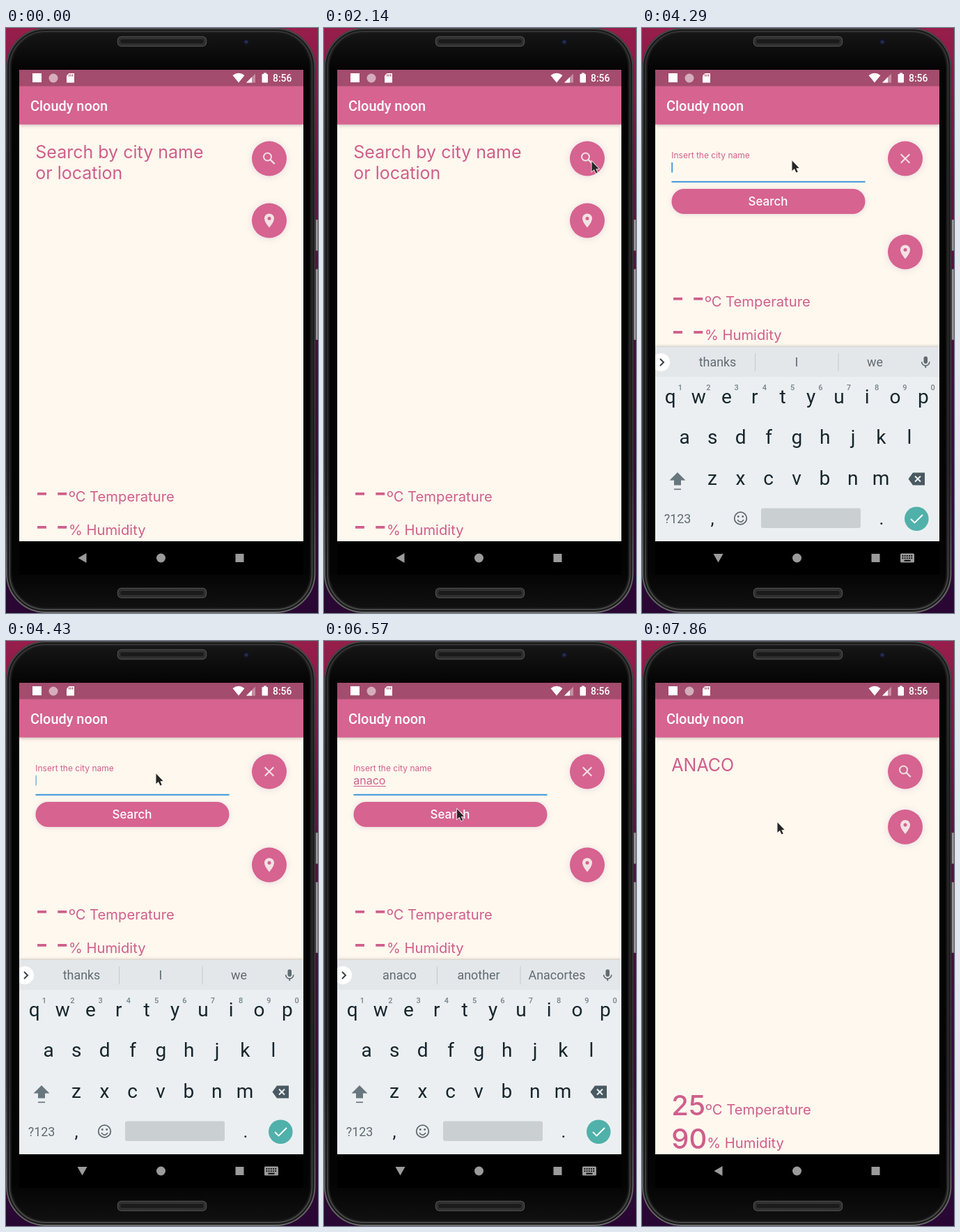
Recreate the animation shown at these times as an HTML page with a canvas. Size 448x840 px, loop 8000 ms.

```html
<!DOCTYPE html>
<html lang="en">
<head>
<meta charset="utf-8">
<title>Cloudy noon</title>
<style>
html, body { margin: 0; width: 100%; height: 100%; overflow: hidden; background: #2b0a34; }
canvas { display: block; width: 448px; height: 840px; }
</style>
</head>
<body>
<canvas id="stage" width="448" height="840"></canvas>
<script>
const g = document.getElementById('stage').getContext('2d');
const LOOP = 8000, FPS = 7;
const PINK = '#d66390', INK = '#cf5f8c', CREAM = '#fff8ee', ICON = '#f3e2e3';
const GREY = '#9b9b9b', BLUE = '#3b97dc', KEY = '#17262d', SLATE = '#5f6b71';
const HALO = 'rgba(165,140,185,.3)';
const UI = 'Inter, sans-serif', SYS = 'Roboto, sans-serif';
const LEFT = 42.3, BOTTOM = 737;

// Times below count steps of 1/7 second.
const OPEN = 17, FOCUS = 27, RAISE = 28, RESULT = 52;
const TYPED = [33, 35, 36, 38, 40];
const CITY = 'anaco';
const HINTS = [
  ['thanks', 'I', 'we'], ['a', 'and', 'are'], ['an', 'and', 'any'],
  ['ana', 'an', 'and'], ['anac', 'an', 'and'], ['anaco', 'another', 'Anacortes']
];
const POINTER = [
  [7, 447, 262], [12, 384, 191], [17, 384, 191], [22, 198, 187], [24, 198, 187],
  [26, 215, 190], [43, 215, 190], [47, 186, 250], [50, 186, 250], [52, 189, 260], [55, 194, 260]
];
// Keyboard offset and opacity while it slides in or out.
const BOARD = { 28: [70, .45], 29: [16, .9], 52: [4, .94], 53: [48, .45] };

function text(s, x, y, size, color, family = UI, weight = 400, align = 'left') {
  g.font = `${weight} ${size}px ${family}`;
  g.fillStyle = color;
  g.textAlign = align;
  g.fillText(s, x, y);
  return g.measureText(s).width;
}

function rect(x, y, w, h, color) {
  g.fillStyle = color;
  g.fillRect(x, y, w, h);
}

function round(x, y, w, h, r, fill, stroke, line = 1) {
  g.beginPath();
  g.roundRect(x, y, w, h, r);
  if (fill) { g.fillStyle = fill; g.fill(); }
  if (stroke) { g.strokeStyle = stroke; g.lineWidth = line; g.stroke(); }
}

function disc(x, y, r, color) {
  g.beginPath();
  g.arc(x, y, r, 0, 7);
  g.fillStyle = color;
  g.fill();
}

function poly(color, ...p) {
  g.beginPath();
  for (let i = 0; i < p.length; i += 2) g.lineTo(p[i], p[i + 1]);
  g.closePath();
  g.fillStyle = color;
  g.fill();
}

function line(color, width, ...p) {
  g.beginPath();
  for (let i = 0; i < p.length; i += 2) g.lineTo(p[i], p[i + 1]);
  g.strokeStyle = color;
  g.lineWidth = width;
  g.stroke();
}

function ring(x, y, r, color, width, from = 0, to = 7) {
  g.beginPath();
  g.arc(x, y, r, from, to);
  g.strokeStyle = color;
  g.lineWidth = width;
  g.stroke();
}

function shadowed(color, blur, dy, draw) {
  g.save();
  g.shadowColor = color;
  g.shadowBlur = blur;
  g.shadowOffsetY = dy;
  draw();
  g.restore();
}

function fade(...stops) {
  const f = g.createLinearGradient(0, 0, 0, 840);
  stops.forEach((c, i) => f.addColorStop(i / (stops.length - 1), c));
  return f;
}

function phone() {
  rect(0, 0, 448, 840, fade('#971e4b', '#6b1546', '#47103f', '#360c3c', '#290733'));
  for (const [y, h] of [[275, 45], [346, 102]]) {
    round(441, y, 9, h, 2, '#777177');
    rect(445.5, y + 1, 1.5, h - 2, '#aaa5a8');
  }
  round(0, 0, 444.5, 840, 57, '#191919');
  round(1, 1, 442.5, 838, 56, null, fade('#4a4a4a', '#383838', '#383838', '#383838', '#6a6a6a'), 2);
  round(5, 5, 434.5, 830, 52, null, fade('#343434', '#2a2a2a', '#2a2a2a', '#2a2a2a', '#484848'), 2);
  const sheen = Array(13).fill('#040404');
  round(8, 8, 428.5, 824, 49, fade('#181818', ...sheen, '#121212'));
  for (const y of [12, 804]) {
    round(160.5, y + .5, 127, 13.5, 5, '#2b2b2b', '#484848', 1.5);
    round(163.5, y + 3.5, 121, 7.5, 3, '#1b1b1b', '#3c3c3c');
  }
  disc(345, 20, 5, '#11131f');
  disc(345, 20, 2.5, '#262c50');
}

function statusBar() {
  rect(19, 60, 408, 23.5, '#a34c6d');
  rect(38, 65, 13, 13, '#fff');
  disc(68, 72, 6.5, '#d5adbc');
  poly('#fff', 90.5, 65, 98, 65, 98, 78.5, 87, 78.5, 87, 68.5);
  for (const x of [90, 92.5, 95]) rect(x, 66.5, 1.2, 3, '#a34c6d');
  g.beginPath();
  g.moveTo(334, 78.5);
  g.lineTo(325.5, 68);
  g.quadraticCurveTo(334, 61.5, 342.5, 68);
  g.closePath();
  g.fillStyle = '#fff';
  g.fill();
  poly('#c68ca2', 345, 78.5, 358, 65.5, 358, 78.5);
  poly('#fff', 345, 78.5, 353, 70.5, 353, 78.5);
  rect(370, 64.5, 4, 2, '#fff');
  round(367.5, 66, 8.5, 12.5, 1, '#fff');
  text('8:56', 383, 77, 13.9, '#fff', SYS, 500);
}

function appBar() {
  shadowed('rgba(90,50,70,.3)', 5, 1, () => rect(19, 83, 408, 55.5, PINK));
  statusBar();
  text('Cloudy noon', 35, 118.5, 19.9, '#fff', SYS, 500);
}

function button(x, y, icon) {
  shadowed(HALO, 10, 1, () => disc(x, y, 25, PINK));
  g.save();
  g.translate(x - 12, y - 12);
  icon();
  g.restore();
}

const icons = {
  search() {
    ring(9.5, 9.5, 5.5, ICON, 2);
    line(ICON, 2.2, 13.6, 13.6, 19.8, 19.8);
  },
  close() {
    line(ICON, 2, 5.7, 5.7, 18.3, 18.3);
    line(ICON, 2, 18.3, 5.7, 5.7, 18.3);
  },
  pin() {
    g.beginPath();
    g.moveTo(12, 22);
    g.bezierCurveTo(12, 22, 5, 14.3, 5, 9);
    g.arc(12, 9, 7, Math.PI, 0);
    g.bezierCurveTo(19, 14.3, 12, 22, 12, 22);
    g.fillStyle = ICON;
    g.fill();
    disc(12, 9, 2.5, PINK);
  }
};

function reading(value, label, y) {
  const w = text(value, LEFT, y, 40, INK, UI, 500);
  text(label, LEFT + w, y - 1, 20.2, INK);
}

function form(n, count) {
  const focused = n >= FOCUS;
  const up = Math.max(0, Math.min(1, (n - FOCUS + 1) / 2));
  text('Insert the city name', LEFT, 198.5 - 12 * up, 16 - 4 * up, INK);
  rect(42.5, focused ? 219.8 : 220.5, 278, focused ? 2 : 1, focused ? BLUE : '#aaa49d');
  const w = count ? text(CITY.slice(0, count), LEFT, 206, 16, INK) : 0;
  if (count) rect(42.5, 208, w, 1, INK);
  if (focused) {
    const typing = n >= TYPED[0] && n < 43;
    g.globalAlpha = typing ? 1 : [1, 1, 1, .6, 0, 0, 0][n % 7];
    rect(LEFT + w, count ? 191 : 193, 1.8, count ? 18 : 14.5, BLUE);
    g.globalAlpha = 1;
  }
  shadowed(HALO, 7, 1, () => round(42.5, 231, 278, 36, 18, PINK));
  text('Search', 181, 255, 17, '#fff', UI, 500, 'center');
}

function content(n, count) {
  const open = n >= OPEN && n < RESULT, done = n >= RESULT;
  rect(19, 83, 408, BOTTOM - 83, CREAM);
  if (open) {
    form(n, count);
  } else if (done) {
    text(CITY.toUpperCase(), LEFT, 187, 25, INK);
  } else {
    text('Search by city name', LEFT, 187, 25, INK);
    text('or location', LEFT, 217, 25, INK);
  }
  button(378, 187.5, open ? icons.close : icons.search);
  button(378, open ? 321.5 : done ? 267 : 276.5, icons.pin);
  const lift = n >= RAISE && n < RESULT ? 280 : 0;
  reading(done ? '25' : '- -', 'ºC Temperature', 681 - lift);
  reading(done ? '90' : '- -', '% Humidity', 728.5 - lift);
}

function keyRow(letters, x, y) {
  [...letters].forEach((c, i) => text(c, x + i * 40.35, y, 28, KEY, SYS, 400, 'center'));
}

function suggestions(count) {
  rect(19, 458, 408, 43, '#e4e7ea');
  disc(27, 480, 13, '#fff');
  line('#3b4449', 2, 26, 475, 31, 480, 26, 485);
  rect(162, 467, 1, 26, '#c3c9cc');
  rect(281.5, 467, 1, 26, '#c3c9cc');
  HINTS[count].forEach((s, i) => {
    const bold = i === 1 && count > 0 && count < 5;
    text(s, [108.5, 222, 334.5][i], 486, 17.9, SLATE, SYS, bold ? 700 : 400, 'center');
  });
  round(404.5, 471.5, 5.5, 10.5, 2.75, SLATE);
  ring(407.2, 479.3, 5.6, SLATE, 1.6, 0, Math.PI);
  rect(406.4, 484.5, 1.7, 3.5, SLATE);
}

function keyboard(count, dy, alpha) {
  g.save();
  g.beginPath();
  g.rect(19, 139, 408, BOTTOM - 139 + Math.min(dy, 4));
  g.clip();
  g.translate(0, dy);
  g.globalAlpha = alpha;
  shadowed('rgba(60,60,60,.3)', 4, -1, () => rect(19, 458, 408, 280, '#eceff1'));
  suggestions(count);
  keyRow('qwertyuiop', 40.8, 539);
  keyRow('asdfghjkl', 61, 597);
  keyRow('zxcvbnm', 101, 655.5);
  [...'1234567890'].forEach((c, i) =>
    text(c, 55 + i * 40.3, 519.5, 11, '#75838a', SYS, 500, 'center'));
  poly('#68777e', 51, 638, 62.5, 649.5, 56, 649.5, 56, 656.5, 46, 656.5, 46, 649.5, 39.5, 649.5);
  rect(46, 661.5, 10, 1.7, '#68777e');
  poly('#485961', 382.5, 647.5, 389, 638.5, 406, 638.5, 406, 656.5, 389, 656.5);
  line('#eceff1', 2, 392, 643.5, 400, 651.5);
  line('#eceff1', 2, 400, 643.5, 392, 651.5);
  text('?123', 51, 710.5, 17.9, SLATE, SYS, 400, 'center');
  text(',', 101, 713, 26, KEY, SYS, 400, 'center');
  text('.', 344, 713, 26, KEY, SYS, 400, 'center');
  ring(141.5, 704, 8.8, SLATE, 1.8);
  disc(138.3, 701.5, 1.4, SLATE);
  disc(144.7, 701.5, 1.4, SLATE);
  ring(141.5, 704.5, 4.6, SLATE, 1.7, .35, 2.8);
  round(171, 689.5, 143, 28.5, 3, '#cacfd2');
  disc(394.3, 704.7, 17.3, '#50b1aa');
  line('#fff', 1.9, 386, 705, 391.5, 710.5, 403, 699);
  g.restore();
}

function navBar(raised) {
  if (raised) {
    poly(GREY, 102.5, 755, 116.5, 755, 109.5, 767.5);
    round(371, 754.5, 20, 13, 1.5, GREY);
    for (let i = 0; i < 10; i++) rect(373.5 + i % 5 * 3.2, 757 + (i / 5 | 0) * 3.3, 1.8, 1.8, '#000');
    rect(376.5, 763.8, 9, 1.8, '#000');
  } else {
    poly(GREY, 103.5, 761, 115.5, 754, 115.5, 768);
  }
  disc(222.5, 761, 6.5, GREY);
  rect(329.5, 755, 12, 12, GREY);
}

function pointer(n) {
  if (n < POINTER[0][0]) return;
  const i = Math.max(1, POINTER.findIndex(p => p[0] >= n));
  const [a, ax, ay] = POINTER[i - 1], [b, bx, by] = POINTER[i];
  const k = (n - a) / (b - a), e = k * k * (3 - 2 * k);
  g.save();
  g.translate(ax + (bx - ax) * e + .5, ay + (by - ay) * e + .5);
  g.beginPath();
  for (const [x, y] of [[0, 0], [0, 14.5], [3.4, 11.5], [6, 17], [8.2, 16], [5.8, 10.8], [10, 10.5]]) g.lineTo(x, y);
  g.closePath();
  g.strokeStyle = '#f4eef0';
  g.lineWidth = 1.6;
  g.stroke();
  g.fillStyle = '#262626';
  g.fill();
  g.restore();
}

function draw(ms) {
  const n = Math.min(55, Math.floor((ms % LOOP + 5) * FPS / 1000));
  const count = TYPED.filter(t => n >= t).length;
  phone();
  rect(19, 60, 408, 725, '#000');
  g.save();
  g.beginPath();
  g.rect(19, 60, 408, BOTTOM - 60);
  g.clip();
  content(n, count);
  appBar();
  g.restore();
  navBar(n >= RAISE && n < RESULT);
  if (n >= RAISE && n < 54) keyboard(count, ...(BOARD[n] || [0, 1]));
  pointer(n);
}

const start = performance.now();
function tick() {
  draw(performance.now() - start);
  requestAnimationFrame(tick);
}
tick();
</script>
</body>
</html>
```
